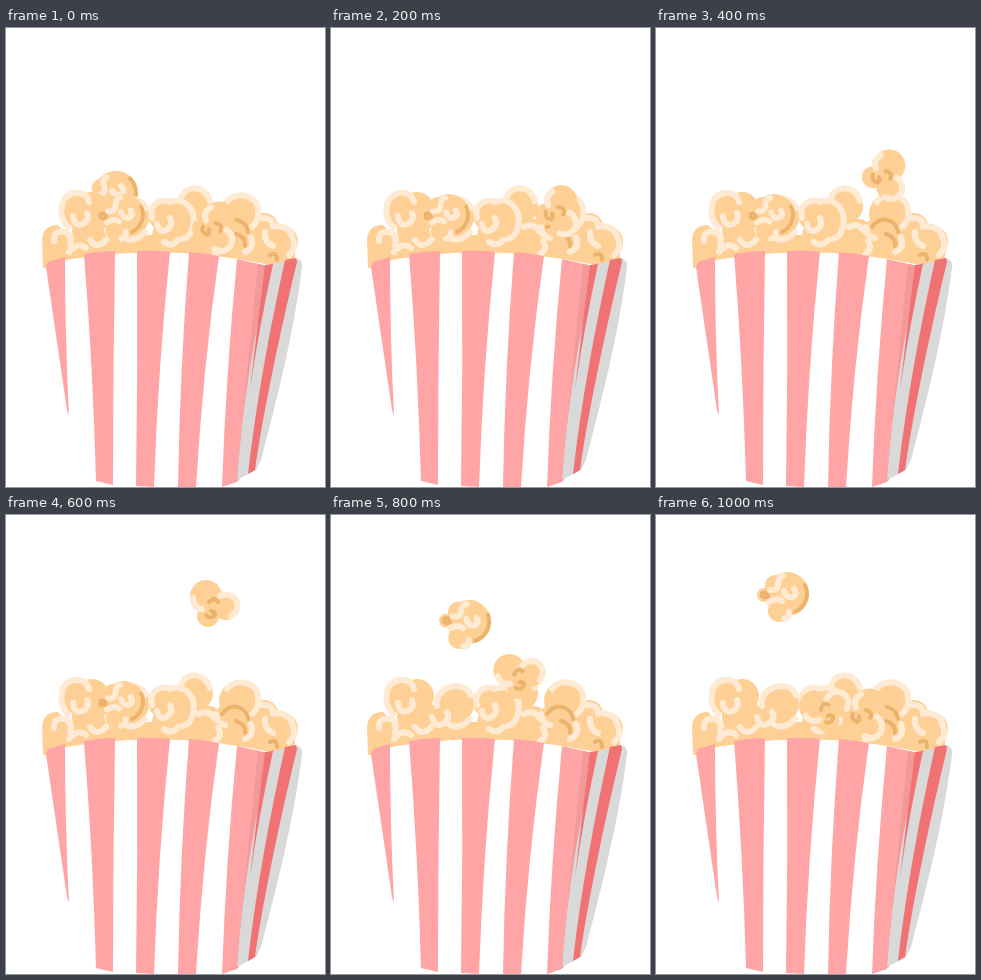
Animation of 319x459 px, one loop 1200 ms. Source, as an HTML page:

```html
<!DOCTYPE html>
<html lang="en">
<meta charset="utf-8">
<title>Popcorn</title>
<style>
html, body { margin: 0; width: 100%; height: 100%; overflow: hidden; background: #fff; }
svg { display: block; width: 100vw; height: 100vh; }
.corn { fill: #ffd095; }
.light, .dark { fill: none; stroke: #ffebd3; stroke-width: 6; stroke-linecap: round; }
.dark { stroke: #ebb36c; stroke-width: 4; }
</style>
<svg viewBox="0 0 319 459">
  <defs>
    <g id="round">
      <g class="corn">
        <circle r="22"/><circle cx="-12" cy="-9" r="10"/>
        <circle cx="-23" cy="1" r="7"/><circle cx="-8" cy="17" r="11"/>
      </g>
      <path class="dark" d="M18-9A20 20 0 0 1 8 18M-25-1q5-2 6 3q-4 3-6 0"/>
      <path class="light" stroke-width="5" d="M-17-4Q-9-3-9-10Q-9-17-4-18M-3-3Q0 6 7 2Q10-1 7-5M-18 8Q-10 3-5 7M2 18Q2 24-3 25"/>
    </g>
    <g id="triple">
      <g class="corn">
        <circle cx="-7" cy="-9" r="16"/><circle cx="13" cy="1" r="14"/><circle cx="-5" cy="11" r="11"/>
      </g>
      <path class="light" d="M7-9C18-14 26-5 24 4Q22 9 18 11M-20-7Q-20 3-11 4"/>
      <path class="dark" d="M-4-3Q2-9 5-3M-7 10Q-3 15 2 10Q2 6-2 6"/>
    </g>
  </defs>

  <use id="roundAir" href="#round"/>

  <g class="corn">
    <path d="M37 240L36 212Q37 197 52 197L62 207H265L290 214L288 240Z"/>
    <circle cx="189" cy="178" r="18"/>
    <circle cx="72" cy="181" r="18"/><circle cx="86" cy="181" r="17"/><circle cx="86" cy="202" r="20"/>
    <circle cx="123" cy="189" r="20"/><circle cx="116" cy="206" r="17"/>
    <circle cx="158" cy="187" r="16"/><circle cx="172" cy="189" r="18"/><circle cx="164" cy="208" r="18"/>
    <circle cx="202" cy="206" r="15"/>
    <circle cx="234" cy="186" r="21"/><circle cx="227" cy="207" r="20"/>
    <circle cx="258" cy="199" r="14"/><circle cx="275" cy="214" r="17"/>
  </g>
  <path class="light" d="M175 170C180 156 199 157 204 173
    M48 213Q47 202 59 204Q67 207 64 217M63 224Q72 213 80 220
    M62 199C51 187 54 168 68 165Q80 163 83 174M67 188Q68 199 77 196Q84 192 81 185M84 212Q91 222 100 212
    M106 191C103 172 132 163 140 180M101 202Q104 214 113 208Q120 202 116 197M117 209Q128 216 139 204
    M146 190C142 174 158 170 164 174C179 168 191 183 187 198Q185 209 177 211M151 196Q154 208 163 200Q167 196 164 190M158 214Q166 220 172 212
    M193 199Q203 194 209 204M212 213Q217 221 209 226
    M221 174C229 162 251 167 252 181Q254 192 246 199M210 199Q211 209 219 210M239 224Q249 220 245 209
    M256 190Q267 189 267 199M259 204Q258 214 267 218M270 198Q284 198 287 211Q291 220 283 227"/>
  <path class="dark" d="M216 199Q224 188 234 193Q241 196 242 204M230 206Q240 209 239 218M264 227Q271 223 271 232"/>

  <use id="roundLanded" href="#round" transform="translate(118 187) scale(.95)"/>
  <use id="tripleLanded" href="#triple" transform="translate(209 200) rotate(60)"/>
  <use id="tripleAir" href="#triple"/>

  <!-- box -->
  <path fill="#fff" d="M40 236Q150 212 265 237L232 459H90L62 388Z"/>
  <g fill="#ffa5a5">
    <path d="M40 239Q40 234 45 233L59 229Q59 310 63 388L61 382Z"/>
    <path d="M78 226Q93 223 109 223Q107 340 107 457L90 453Q87 340 78 226Z"/>
    <path d="M131 223Q148 222 164 224Q152 340 148 459L130 458Q132 340 131 223Z"/>
    <path d="M183 224Q198 225 213 228Q197 340 190 459H172Q174 340 183 224Z"/>
    <path d="M231 231L262 238L231 454L216 459Q220 345 231 231Z"/>
  </g>
  <path fill="#f49999" d="M252 236L262 238L268 235L233 452L230 454Z"/>
  <path fill="#d9d9d9" d="M265 237L290 230Q297 232 296 239C288 305 270 375 255 432L250 442L231 452Q239 340 265 237Z"/>
  <path fill="#f07272" d="M279 232L290 230L291 234C275 300 257 385 249 442L242 446C250 375 264 300 279 232Z"/>
  <path fill="#f07272" d="M259 237L267 236Q253 300 244 362Q251 300 259 237Z"/>
</svg>
<script>
const STEP = 200;
// One [x, y, angle] pose per step; null hides the piece.
const roundPoses = [[110, 165, -20], null, null, null, [138, 107, 6], [131, 79, 0]];
const triplePoses = [null, [227, 184, 55], [229, 148, 60], [207, 90, 0], [188, 161, -20], [170, 195, -35]];
const $ = id => document.getElementById(id);

function show(id, visible) {
  $(id).style.display = visible ? "" : "none";
}

function pose(id, p) {
  show(id, p);
  if (p) $(id).setAttribute("transform", `translate(${p[0]} ${p[1]}) rotate(${p[2]})`);
}

const start = performance.now();
function draw(now) {
  const i = Math.floor(Math.max(0, now - start) / STEP) % 6;
  pose("roundAir", roundPoses[i]);
  pose("tripleAir", triplePoses[i]);
  show("roundLanded", i < 4);
  show("tripleLanded", i === 0 || i === 5);
  requestAnimationFrame(draw);
}
draw(start);
</script>
</html>
```
